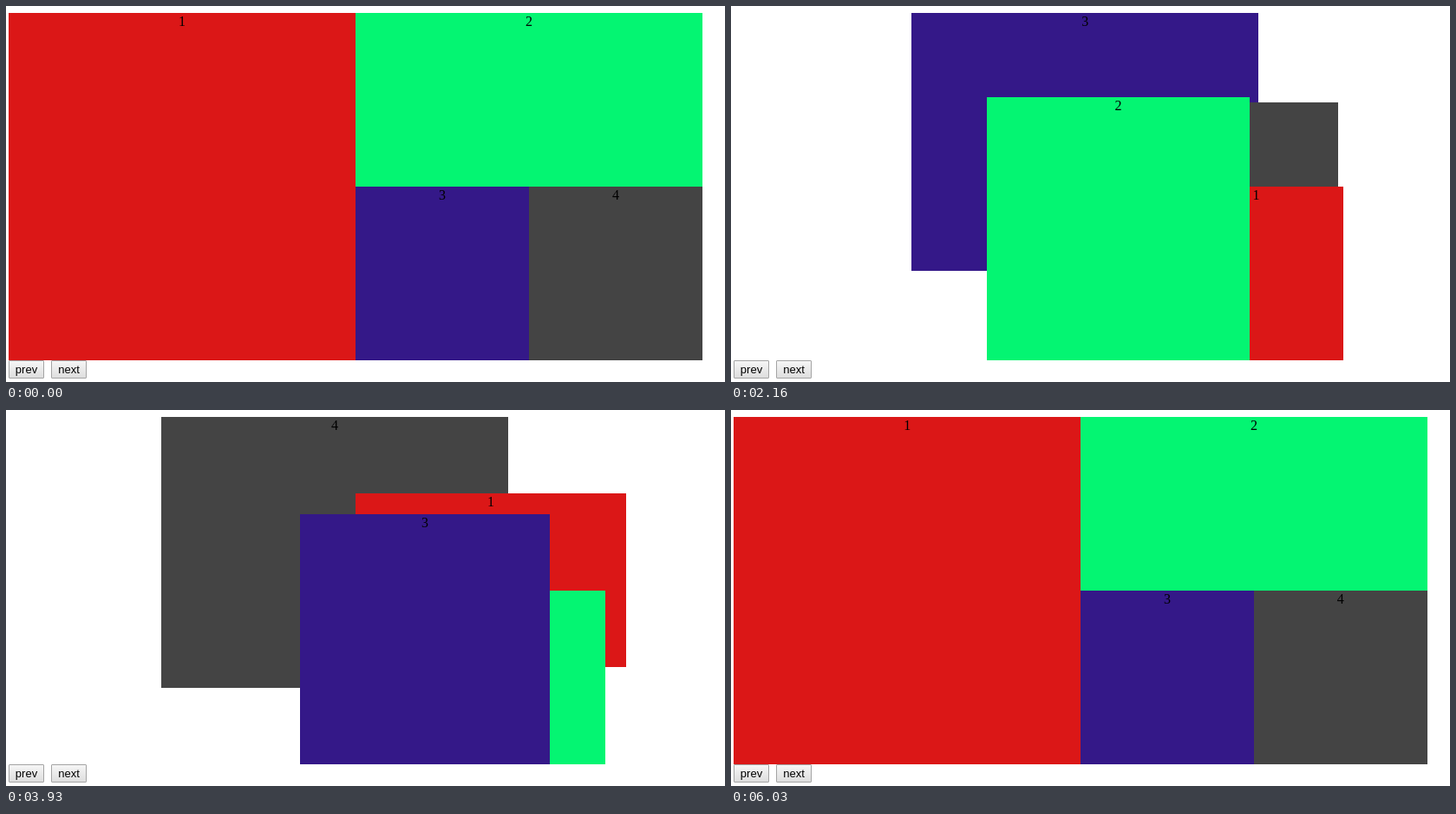
Animation of 829x433 px, one loop 6.42 s. Source, as an HTML page:

```html
<!DOCTYPE html>
<html lang="en">
<head>
<meta charset="utf-8">
<title>Rotating tiles</title>
<style>
html, body { margin: 0; width: 100%; height: 100%; overflow: hidden; background: #fff; }
.tile {
  position: absolute;
  overflow: hidden;
  color: #000;
  font: 16px/20px "Liberation Serif", serif;
  text-align: center;
}
button {
  position: absolute;
  top: 408px;
  box-sizing: border-box;
  width: 41px;
  height: 21px;
  margin: 0;
  padding: 0;
  border: 1px solid #a4a4a4;
  border-radius: 1px;
  background: linear-gradient(#f6f6f6, #dedede);
  color: #000;
  font: 13px/19px "Liberation Sans", sans-serif;
  text-align: center;
}
</style>
</head>
<body>
<button style="left:3px">prev</button>
<button style="left:52px">next</button>
<script>
const LOOP = 6420, TICK = 30;
const COLORS = ['#db1717', '#04f572', '#341888', '#444'];
// left, top, width, height
const SLOTS = [
  [3, 8, 400, 400],
  [403, 8, 400, 200],
  [403, 208, 200, 200],
  [603, 208, 200, 200]
];
// first visible tick, start of the easing, duration
const RUNS = [
  [360, 312.6, 682],
  [1830, 1803.5, 725],
  [3540, 3534.4, 735],
  [5370, 5344.6, 695]
];

const tiles = COLORS.map((color, i) => {
  const tile = document.createElement('div');
  tile.className = 'tile';
  tile.textContent = i + 1;
  tile.style.background = color;
  document.body.append(tile);
  return tile;
});

const swing = t => 0.5 - Math.cos(Math.PI * Math.min(1, Math.max(0, t))) / 2;

function draw(time) {
  const done = Math.max(0, RUNS.filter(run => time >= run[0]).length - 1);
  const [first, start, duration] = RUNS[done];
  const p = time < first ? 0 : swing((time - start) / duration);

  tiles.forEach((tile, i) => {
    const slot = (i - done + 4) % 4;
    const next = (slot + 3) % 4;
    const [x, y, w, h] = SLOTS[slot].map((a, k) => a + (SLOTS[next][k] - a) * p);
    Object.assign(tile.style, {
      left: x + 'px',
      top: y + 'px',
      width: w + 'px',
      height: h + 'px',
      zIndex: next
    });
  });
}

const origin = performance.now();
function frame() {
  const time = (performance.now() - origin) % LOOP;
  draw(Math.floor(time / TICK) * TICK);
  requestAnimationFrame(frame);
}
frame();
</script>
</body>
</html>
```
